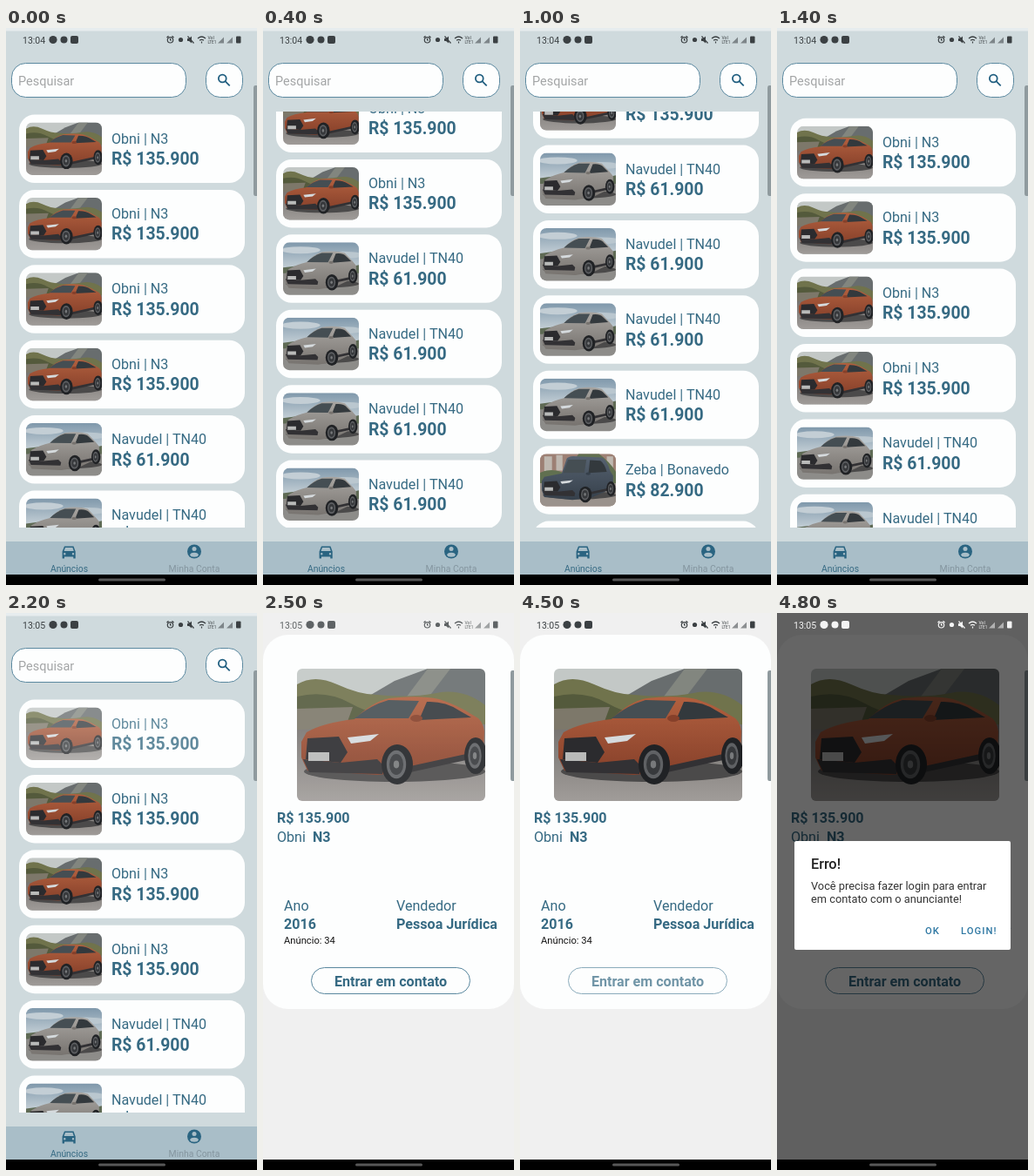
Animation of 288x640 px, one loop 5.8 s. Source, as an HTML page:

```html
<!DOCTYPE html>
<html lang="pt-BR">
<head>
<meta charset="utf-8">
<style>
  html, body { margin: 0; width: 100%; height: 100%; overflow: hidden; background: #000; }
  svg { display: block; }
  text { font-family: Roboto, "Open Sans", sans-serif; font-size: 16.1px; fill: #366a83; }
  .b { font-weight: 700; }
  .price { font-weight: 700; font-size: 19.4px; }
  .tab { font-size: 10.4px; text-anchor: middle; }
  .field { fill: #fdfefe; stroke: #5a889f; }
  .act { font-size: 11.3px; font-weight: 500; letter-spacing: 1px; fill: #2f78a3; }
  .msg { font-size: 12.8px; fill: #333; }
</style>
</head>
<body>
<svg width="288" height="640" viewBox="0 0 288 640">
  <defs id="defs">
    <clipPath id="thumb"><rect width="216" height="150" rx="18"/></clipPath>
    <clipPath id="large"><rect width="216" height="152" rx="6"/></clipPath>
  </defs>

  <g id="home">
    <rect width="288" height="628" fill="#cfdadd"/>
    <rect width="288" height="3.5" fill="#e6ecee"/>
    <rect class="field" x="6.5" y="40.5" width="200" height="39" rx="16"/>
    <text x="14" y="65.5" style="font-size:14.5px;fill:#a3a5a6">Pesquisar</text>
    <rect class="field" x="229.5" y="40.5" width="42" height="39" rx="16"/>
    <g fill="none" stroke="#215f80" stroke-width="1.8">
      <circle cx="248.3" cy="58" r="4.4"/><path d="M251.5 61.2l5.2 5.2"/>
    </g>
    <svg y="96" width="288" height="478"><g id="list"></g></svg>
    <rect y="590" width="288" height="38" fill="#a9bec8"/>
    <path fill="#2a6481" fill-rule="evenodd" d="M67 595.5h10.500l2.200 6v8h-2.400v-2H67v2h-2.400v-8zM68 597l-1.400 4h11.200l-1.400-4zM67.300 603a1.200 1.200 0 100 2.400 1.200 1.200 0 000-2.400zM77 603a1.200 1.200 0 100 2.400 1.200 1.200 0 000-2.400z"/>
    <text class="tab" x="72.5" y="625">Anúncios</text>
    <circle cx="216" cy="601.5" r="8" fill="#2a6481"/>
    <g fill="#a9bec8"><circle cx="216" cy="598.6" r="2.5"/><ellipse cx="216" cy="605.2" rx="4.7" ry="2.5"/></g>
    <text class="tab" x="216" y="625" style="fill:#84959f">Minha Conta</text>
  </g>

  <g id="detail">
    <rect width="288" height="628" fill="#f0f0f0"/>
    <rect y="25" width="288" height="430" rx="29" fill="#fdfefe"/>
    <use id="photo" href="#p0" transform="translate(39 64)" clip-path="url(#large)"/>
    <text class="b" x="16" y="241">R$ 135.900</text>
    <text x="16" y="263">Obni</text><text class="b" x="57" y="263">N3</text>
    <text x="24" y="342">Ano</text><text class="b" x="24" y="363">2016</text>
    <text x="24" y="380" style="font-size:11.2px;fill:#111">Anúncio: 34</text>
    <text x="153" y="342">Vendedor</text><text class="b" x="153" y="363">Pessoa Jurídica</text>
    <g id="contact">
      <rect class="field" x="55.5" y="407.5" width="182" height="30" rx="15"/>
      <text class="b" x="146.5" y="429" text-anchor="middle">Entrar em contato</text>
    </g>
  </g>

  <path d="M288 66h-2q-2 0-2 3v121q0 3 2 3h2z" fill="#8f9a9e"/>
  <rect id="dim" width="288" height="628"/>

  <g id="status">
    <text id="clock" x="19" y="17.5" style="font-size:10.5px;fill:currentColor"></text>
    <g fill="currentColor">
      <circle cx="54" cy="13.5" r="4.6"/><circle cx="66.5" cy="13.5" r="4"/>
      <rect x="74" y="9" width="9" height="9" rx="2"/>
      <circle cx="200.5" cy="13.5" r="2.6"/>
      <path d="M208 12h2l3-2.5v8l-3-2.5h-2z"/>
      <path d="M243 17.5h7v-7zM253 17.5h7v-7z" opacity=".55"/>
      <rect x="264" y="9.5" width="5.5" height="8" rx="1"/>
    </g>
    <g fill="none" stroke="currentColor" stroke-width="1.2">
      <circle cx="188.5" cy="13.8" r="3.2"/>
      <path d="M188.5 12v2h1.5M184.5 11l2-1.8M192.5 11l-2-1.8M208.5 9.5l7 8M220 12q4.500-4 9 0M222 14.300q2.500-2 5 0M224.500 15.500v2"/>
    </g>
    <text x="231.5" y="13" style="font-size:5px;fill:currentColor">VoI</text>
    <text x="231.5" y="17.5" style="font-size:4.6px;fill:currentColor">LTE1</text>
  </g>

  <g id="alert">
    <rect x="20" y="262" width="248" height="125" rx="2" fill="#fff"/>
    <text x="39" y="294" style="font-size:16.3px;font-weight:500;fill:#222">Erro!</text>
    <text class="msg" x="39" y="318">Você precisa fazer login para entrar</text>
    <text class="msg" x="39" y="333">em contato com o anunciante!</text>
    <text class="act" x="170" y="369">OK</text>
    <text class="act" x="211" y="369">LOGIN!</text>
  </g>

  <rect y="628" width="288" height="12"/>
  <rect x="106" y="632.5" width="77" height="3" rx="1.5" fill="#575757"/>
</svg>

<script>
const $ = id => document.getElementById(id);
const path = (fill, d) => `<path fill="${fill}" d="${d}"/>`;
const oval = (fill, x, y, rx, ry) => `<ellipse fill="${fill}" cx="${x}" cy="${y}" rx="${rx}" ry="${ry}"/>`;
const fade = (id, top, bottom) => `<linearGradient id="${id}" x2="0" y2="1"><stop stop-color="${top}"/><stop offset="1" stop-color="${bottom}"/></linearGradient>`;

const wheel = (x, y, rx, ry) => oval('#202225', x, y, rx + 2, ry + 1) + oval('#5f6164', x - 1, y, rx * .7, ry * .74) +
  oval('#37393c', x - 1, y, rx * .5, ry * .54) + oval('#77797b', x - 1, y, rx * .2, ry * .2);

function car(id, { top, low, body, glass, side, front, rear }) {
  return fade(id, top, low) + oval('#4b4a4a', 112, 118, 104, 12) + path(`url(#${id})`, body) +
    path('#454e53', glass) + path('#33393d', side) +
    path('#2b2b2e', 'M12 80L48 78L58 96L50 108L10 104Z') +
    path('#d5dadd', 'M58 79L94 75L84 83L62 86Z') +
    path('#323134', 'M7 104L50 108L92 104L100 112L98 121L14 119ZM130 112L194 98V105L130 119Z') +
    path('#b9bab9', 'M13 96h24v10h-24z') +
    oval(low, 137, 57, 7, 4) + wheel(...front, 16, 22) + wheel(...rear, 11, 20);
}

const photos = [
  fade('road', '#75726f', '#a09c99') +
  path('#c3c8c6', 'M0 0h216v152H0z') +
  path('#686d6e', 'M78 34L112 14L150 0H216V70H78z') +
  path('#82867f', 'M150 0L176 0L150 34L120 40z') +
  path('#70734c', 'M0 18Q20 6 46 18T92 30Q130 34 160 28T216 42V78H0z') +
  path('#545a3c', 'M0 32Q34 24 62 40T100 44V62H0z') +
  path('#7d786a', 'M0 46L64 44L56 66L0 74z') +
  path('url(#road)', 'M0 70L216 64V152H0z') +
  car('coupe', {
    top: '#b2603f', low: '#86402a', front: [115, 110], rear: [205, 100],
    body: 'M5 84L11 73Q30 62 66 58Q86 38 106 34Q140 30 163 35Q185 42 203 54Q213 58 215 72L214 96L132 118L92 122L12 117L5 102Z',
    glass: 'M66 57Q84 42 105 36L140 37L128 57Z', side: 'M140 59L149 38Q170 37 186 48L200 56Z'
  }),

  fade('sky', '#7f98ab', '#d3dbdf') +
  path('url(#sky)', 'M0 0h216v90H0z') +
  oval('#c3ced5', 50, 22, 56, 10) + oval('#bac7cf', 170, 36, 60, 10) +
  path('#5f6b55', 'M0 72Q60 62 110 70T216 64V92H0z') +
  path('#8d8c89', 'M0 88H216V152H0z') +
  car('hatch', {
    top: '#a8a5a1', low: '#77736f', front: [139, 114], rear: [199, 96],
    body: 'M6 92L16 76Q40 62 68 56Q88 34 112 27Q150 22 176 30L198 54L208 66V98L150 126L100 134L16 130L6 112Z',
    glass: 'M68 56Q86 38 110 30L142 30L128 57Z', side: 'M140 58L150 32Q170 30 178 38L194 54Z'
  }),

  path('#9d8074', 'M0 0h216v152H0z') +
  path('#bfb8b0', 'M12 8h22v44H12zM46 4h18v44H46zM190 8h18v40h-18z') +
  path('#617050', 'M0 54Q34 38 70 56L110 0H168Q200 24 216 52V86H0z') +
  path('#9a928c', 'M0 84H216V152H0z') +
  car('jeepish', {
    top: '#566270', low: '#36404b', front: [129, 116], rear: [202, 100],
    body: 'M5 78L12 66L62 56L76 14Q80 8 94 7L176 11Q190 16 200 50L208 62V98L144 126L92 132L12 124L5 104Z',
    glass: 'M66 55L80 17L132 17L126 55Z', side: 'M138 55L142 18L172 20Q184 28 190 52Z'
  })
];
$('defs').innerHTML += photos.map((art, i) => `<g id="p${i}">${art}</g>`).join('').replaceAll('jeepish', 'boxy');

const models = [['Obni | N3', '135.900'], ['Navudel | TN40', '61.900'], ['Zeba | Bonavedo', '82.900']];
$('list').innerHTML = Array.from({ length: 12 }, (_, i) => {
  const kind = i >> 2, [name, price] = models[kind];
  return `<g transform="translate(15 ${3.5 + i * 86.4})">
    <rect width="259" height="78.5" rx="18" fill="#fdfefe"/>
    <g class="content">
      <use href="#p${kind}" transform="translate(8 9) scale(.403)" clip-path="url(#thumb)"/>
      <text x="106" y="33">${name}</text><text class="price" x="106" y="57.5">R$ ${price}</text>
    </g></g>`;
}).join('');
const pressed = document.querySelector('.content');

// Value at time t from [time, value] keys, with linear or cosine easing.
function track(t, keys, ease = u => u) {
  const i = keys.findIndex(k => k[0] > t);
  if (i < 0) return keys.at(-1)[1];
  if (i === 0) return keys[0][1];
  const [t0, a] = keys[i - 1], [t1, b] = keys[i];
  return a + (b - a) * ease((t - t0) / (t1 - t0));
}
const wave = u => (1 - Math.cos(Math.PI * u)) / 2;

function draw(now) {
  const t = Math.floor(now % 5800 / 100) * 100;
  const held = t >= 2500 && t < 3500 ? 2500 : t >= 3500 && t < 4100 ? 3500 : t;
  const scroll = track(t, [[0, 0], [800, 415.5], [1400, -4.3], [1700, 0]], wave);
  const shown = track(held, [[2300, 0], [2500, 1]]);
  const dim = track(t, [[4600, 0], [4800, .6]]);

  $('list').setAttribute('transform', `translate(0 ${-scroll})`);
  pressed.setAttribute('opacity', track(t, [[2000, 1], [2200, .78], [2300, .6]]));
  $('detail').setAttribute('opacity', shown);
  $('detail').setAttribute('transform', `translate(0 ${24 * (1 - shown)})`);
  $('photo').setAttribute('opacity', track(held, [[2500, .9], [3500, .93], [4300, 1]]));
  $('contact').setAttribute('opacity', track(t, [[4200, 1], [4500, .7], [4600, .7], [4800, 1]]));
  $('dim').setAttribute('opacity', dim);
  $('alert').setAttribute('opacity', dim / .6);
  $('status').setAttribute('color', dim > .4 ? '#f4f4f4' : '#3b4043');
  $('status').setAttribute('opacity', track(held, [[2300, 1], [2500, .8], [3500, .8], [4300, 1]]));
  $('clock').textContent = t < 1800 ? '13:04' : '13:05';
}

let start;
function tick(now) {
  start ??= now;
  draw(now - start);
  requestAnimationFrame(tick);
}
draw(0);
requestAnimationFrame(tick);
</script>
</body>
</html>
```
